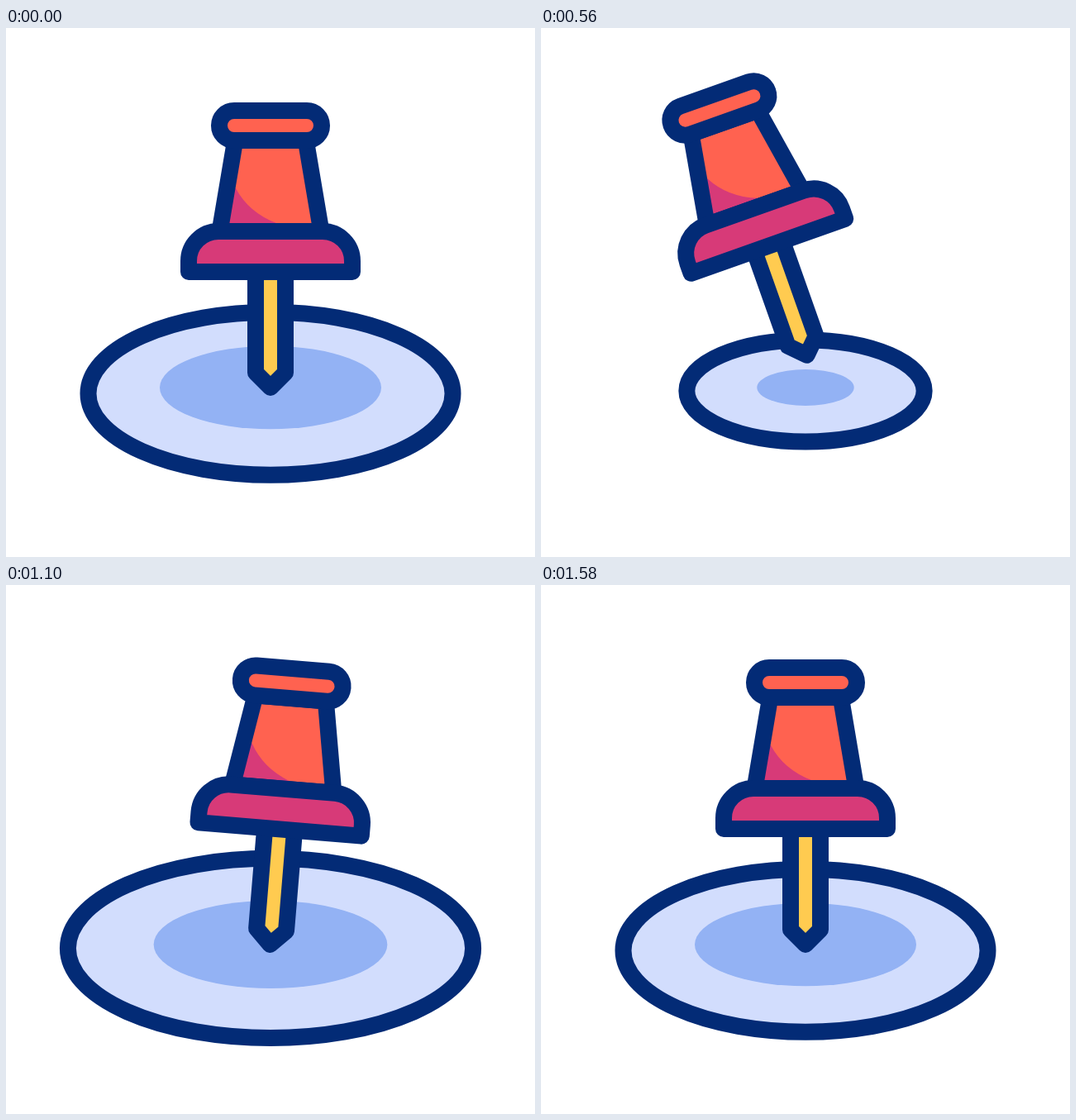
Animation, 640 px wide and 640 px high, one loop 3 s. Source, as an HTML page with a canvas:

```html
<!DOCTYPE html>
<html lang="en">
<head>
<meta charset="utf-8">
<title>Push pin</title>
<style>
html, body { margin: 0; width: 100%; height: 100%; overflow: hidden; background: #fff; }
canvas { display: block; width: 100vw; height: 100vh; }
</style>
</head>
<body>
<canvas id="stage"></canvas>
<script>
const SIZE = 640, LOOP = 3000, CX = 320, PIVOT = 430;
const RISE = 255, DROP = 120, SETTLE = 260;
const NAVY = '#032b76', RED = '#ff6250', PINK = '#d73a78', YELLOW = '#ffcb50',
      PALE = '#d2ddfd', BLUE = '#93b2f4';

const canvas = document.getElementById('stage');
const ctx = canvas.getContext('2d');
const dpr = window.devicePixelRatio || 1;
canvas.width = canvas.height = SIZE * dpr;

// Smooth step from 0 to 1, starting at a and lasting d.
function ease(t, a, d) {
  const u = Math.min(1, Math.max(0, (t - a) / d));
  return u * u * (3 - 2 * u);
}

// Wind up from rest to low, then rebound: overshoot, dip, rest.
function swing(t, from, turn, rest, low, high, dip) {
  const top = turn + RISE, bottom = top + DROP;
  return rest
    + (low - rest) * ease(t, from, turn - from)
    + (high - low) * ease(t, turn, RISE)
    + (dip - high) * ease(t, top, DROP)
    + (rest - dip) * ease(t, bottom, SETTLE);
}

function paint(path, fill, line) {
  if (fill) {
    ctx.fillStyle = fill;
    ctx.fill(path);
  }
  if (line) {
    ctx.strokeStyle = line;
    ctx.stroke(path);
  }
}

function ellipse(cy, rx, ry) {
  const p = new Path2D();
  p.ellipse(CX, cy, rx, ry, 0, 0, Math.PI * 2);
  return p;
}

const needle = new Path2D('M302 290V417L320 435L338 417V290Z');
const body = new Path2D('M277.2 136L258.6 246H381.4L362.8 136Z');
const shade = new Path2D('M260 194H278Q293.5 223 327 236L332 246H250Z');
const base = new Path2D('M221 295V282A36 36 0 0 1 257 246H383A36 36 0 0 1 419 282V295Z');
const cap = new Path2D('M276 100H364A18 18 0 0 1 364 136H276A18 18 0 0 1 276 100Z');

function drawTarget(t) {
  const ring = (...values) => swing(t, 143, 863, ...values);
  const rx = ring(220.5, 96.5, 247, 179.5);
  const ry = ring(98.5, 38.7, 109.5, 76);
  const cy = ring(442.25, 437, 439.5, 437.3);
  const spot = swing(t, 75, 805, 1, 0.24, 1.14, 0.825);
  paint(ellipse(cy, rx, ry), PALE, NAVY);
  paint(ellipse(435, 134 * spot, 50.3 * spot), BLUE);
}

function drawSparks(t) {
  const head = 60 * ease(t, 1120, 215), tail = 60 * ease(t, 1150, 300);
  if (head - tail < 0.2) return;
  ctx.strokeStyle = RED;
  for (const side of [-1, 1]) {
    const at = d => [CX + side * (34 + d * 0.848), 446.8 - d * 0.53];
    ctx.beginPath();
    ctx.moveTo(...at(tail));
    ctx.lineTo(...at(head));
    ctx.stroke();
  }
}

function drawPin(t) {
  const lift = 64 * (ease(t, 200, 630) - ease(t, 845, 145));
  const tilt = swing(t, 0, 833, 0, -26, 5, -3.3);
  ctx.save();
  ctx.translate(CX, PIVOT - lift);
  ctx.rotate(tilt * Math.PI / 180);
  ctx.translate(-CX, -PIVOT);
  paint(needle, YELLOW, NAVY);
  paint(body, RED);
  ctx.save();
  ctx.clip(body);
  paint(shade, PINK);
  ctx.restore();
  paint(body, null, NAVY);
  paint(base, PINK, NAVY);
  paint(cap, RED, NAVY);
  ctx.restore();
}

function draw(t) {
  ctx.setTransform(dpr, 0, 0, dpr, 0, 0);
  ctx.fillStyle = '#fff';
  ctx.fillRect(0, 0, SIZE, SIZE);
  ctx.lineWidth = 20;
  ctx.lineJoin = ctx.lineCap = 'round';
  drawTarget(t);
  drawSparks(t);
  drawPin(t);
}

const start = performance.now();
function tick() {
  draw((performance.now() - start) % LOOP);
  requestAnimationFrame(tick);
}
tick();
</script>
</body>
</html>
```
